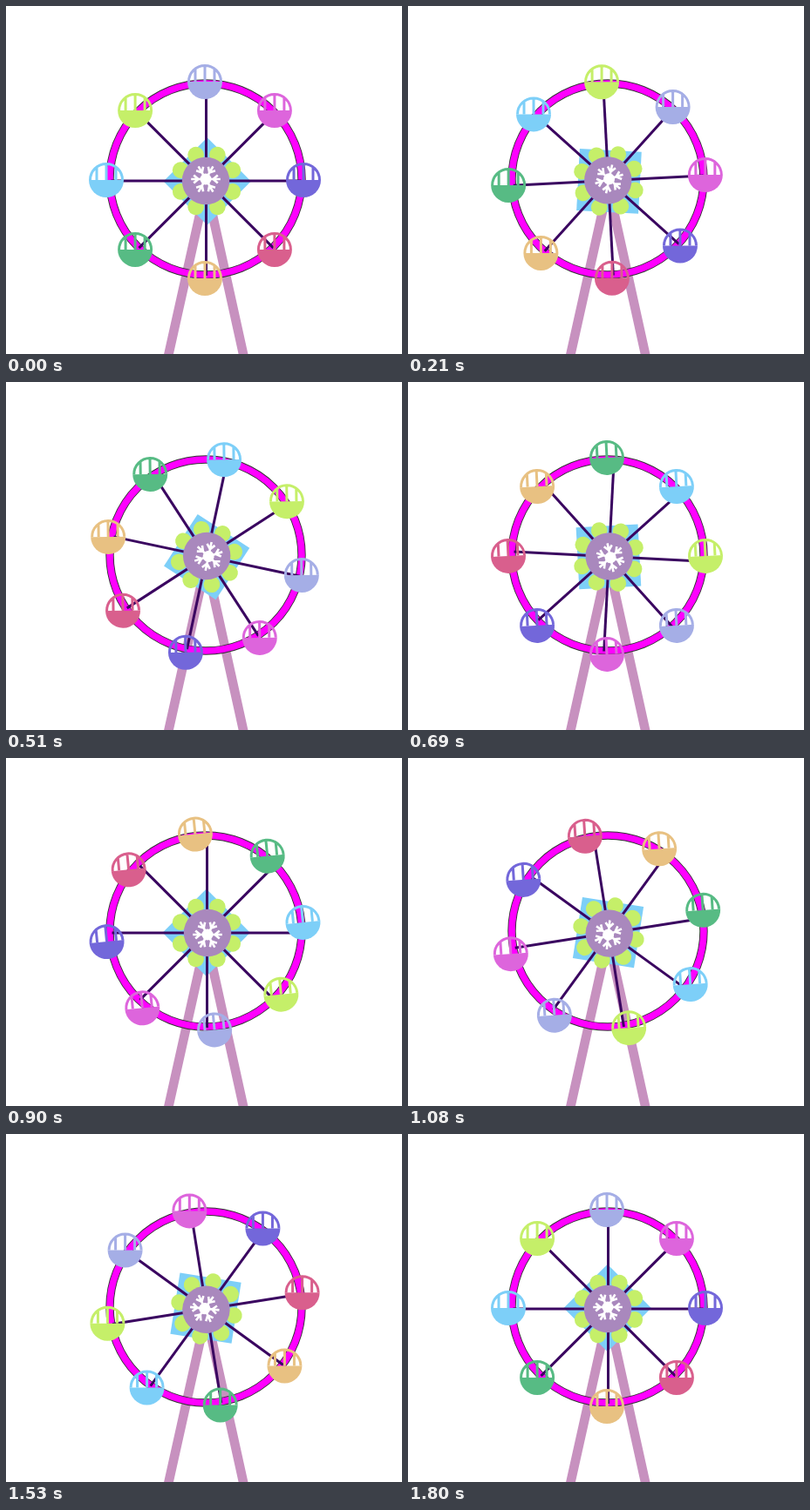
Write an HTML page that moves like this. It is 454 px wide and 400 px high and loops after 1.93 s.

```html
<!DOCTYPE html>
<html lang="en">
<head>
<meta charset="utf-8">
<title>Ferris wheel</title>
<style>
  html, body { margin: 0; width: 100%; height: 100%; overflow: hidden; background: #fff; }
  svg { display: block; width: 454px; height: 400px; }
</style>
</head>
<body>
<svg id="stage" viewBox="0 0 454 400" xmlns="http://www.w3.org/2000/svg">
  <path d="M231 200L184.3 410M228 200L274.2 410" stroke="#c791bf" stroke-width="10.6" fill="none"/>
  <g fill="none">
    <circle cx="229" cy="199" r="110" stroke="#333" stroke-width="9.4"/>
    <circle cx="229" cy="199" r="110" stroke="#ff00ff" stroke-width="7.6"/>
  </g>
  <rect id="diamond" x="-35.5" y="-35.5" width="71" height="71" fill="#7dcff8"/>
  <g id="spokes" stroke="#3a0560" stroke-width="3"></g>
  <g id="cabins"></g>
  <g id="hub">
    <g id="petals" fill="#c5ef69"></g>
    <circle cx="-1" cy="0" r="27.2" fill="#a988bd"/>
    <g id="flake" transform="translate(-1 -2)" fill="none" stroke="#fff" stroke-width="2.6"></g>
  </g>
</svg>
<script>
const STEP = 30, LAST = 60, LOOP = 1930;
const CABIN_COLORS = ['#a5aee6', '#dd65dc', '#7367da', '#d95f8d',
                      '#e8c182', '#57bb84', '#7dcff8', '#c5ef69'];
// [step, degrees] for the ring of cabins
const CABIN_KEYS = [[0, 0], [15, 90], [23, 135], [31, 180], [38, 225], [45, 270], [60, 360]];

const byId = id => document.getElementById(id);
const place = (el, value) => el.setAttribute('transform', value);

function add(parent, tag, attrs) {
  const el = document.createElementNS('http://www.w3.org/2000/svg', tag);
  for (const key in attrs) el.setAttribute(key, attrs[key]);
  return parent.appendChild(el);
}

for (let i = 0; i < 4; i++) {
  add(byId('spokes'), 'path', { d: 'M0 -109V109', transform: `rotate(${i * 45})` });
}
for (let i = 0; i < 8; i++) {
  add(byId('petals'), 'circle', { cx: 0, cy: -32.3, r: 9.3, transform: `rotate(${22.5 + i * 45})` });
}
for (let i = 0; i < 6; i++) {
  add(byId('flake'), 'path', { d: 'M0 0H16.8M8.5 0L13.8 -4.6M8.5 0L13.8 4.6', transform: `rotate(${i * 60})` });
}
add(byId('flake'), 'circle', { r: 6.5, fill: '#fff', stroke: 'none' });

const cabins = CABIN_COLORS.map(color => {
  const cabin = add(byId('cabins'), 'g', {});
  add(cabin, 'path', { d: 'M-20 0A20 20 0 0 0 20 0Z', fill: color });
  add(cabin, 'path', {
    d: 'M-18.5 0A18.5 18.5 0 0 1 18.5 0M-11 0V-15M0 0V-18M11 0V-15',
    fill: 'none', stroke: color, 'stroke-width': 3
  });
  return cabin;
});

function cabinAngle(step) {
  const n = CABIN_KEYS.findIndex(([s]) => s >= step);
  if (n === 0) return 0;
  const [s0, a0] = CABIN_KEYS[n - 1], [s1, a1] = CABIN_KEYS[n];
  return a0 + (a1 - a0) * (step - s0) / (s1 - s0);
}

function draw(step) {
  const turn = step * 6, ring = cabinAngle(step), part = step / LAST;
  place(byId('spokes'), `translate(230 201) rotate(${turn}) translate(-.5 0)`);
  place(byId('hub'), `translate(230 201) rotate(${turn})`);
  // the diamond turns backwards and drifts slightly
  place(byId('diamond'), `translate(${230.7 - 2 * part} ${201.5 - 1.5 * part}) rotate(${45 - turn})`);
  cabins.forEach((cabin, i) => {
    const a = (ring + i * 45) * Math.PI / 180;
    const x = 228 + 113 * Math.sin(a), y = 200 - 113 * Math.cos(a);
    place(cabin, `translate(${x} ${y}) rotate(${ring - turn})`);
  });
}

const start = performance.now();
function tick() {
  const time = (performance.now() - start) % LOOP;
  draw(Math.min(LAST, Math.floor(time / STEP)));
  requestAnimationFrame(tick);
}
tick();
</script>
</body>
</html>
```
